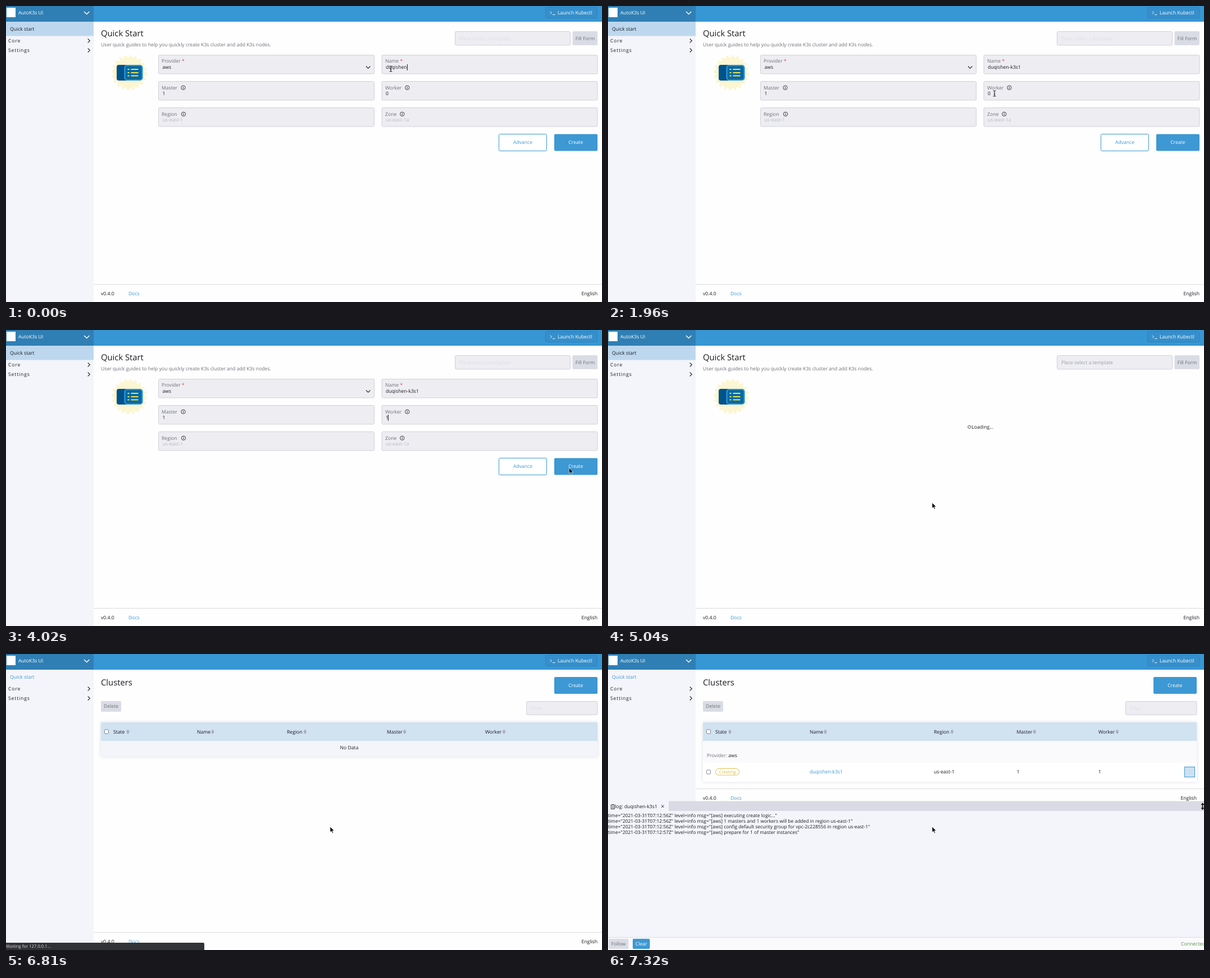
An HTML page for the animation above (8000 ms loop, 1061 by 528 pixels).

```html
<!DOCTYPE html>
<html lang="en">
<head>
<meta charset="utf-8">
<title>Quick Start</title>
<style>
html, body { margin: 0; width: 100%; height: 100%; overflow: hidden; background: #fefefe; }
svg { display: block; width: 1061px; height: 528px; }
text { font: 8.65px "Open Sans", "Noto Sans", sans-serif; fill: #1b1b21; text-rendering: geometricPrecision; white-space: pre; }
.title { font-size: 14.8px; }
.nav { letter-spacing: .85px; }
.mid { text-anchor: middle; }
.end { text-anchor: end; }
.muted { fill: #6f6f79; }
.faint { fill: #b9bac3; }
.ghost { fill: #dddee5; }
.red { fill: #f04848; }
.blue { fill: #3d98d3; }
.white { fill: #fff; }
.log text { font-size: 8.45px; }
.field { fill: #ededf2; stroke: #d0d1db; }
.grey { fill: #dadce5; }
.side { fill: #f4f5fa; }
.head { fill: #d1e2f1; }
.outline { fill: #fff; stroke: #3d98d3; }
.line { fill: none; stroke: #26262c; }
.rule { stroke: #dcdce1; }
.soft { filter: drop-shadow(0 0 3px #dfe0e8); }

/* One 8 s timeline, hard steps only. */
.a { animation: 8s step-end infinite; }
.k1 { animation-name: k1; } .k2 { animation-name: k2; } .k3 { animation-name: k3; }
.k4 { animation-name: k4; } .k5 { animation-name: k5; }
@keyframes k1 { 0% { fill-opacity: 0 } 3.75%, to { fill-opacity: 1 } }
@keyframes k2 { 0% { fill-opacity: 0 } 7.875%, to { fill-opacity: 1 } }
@keyframes k3 { 0% { fill-opacity: 0 } 9.75%, to { fill-opacity: 1 } }
@keyframes k4 { 0% { fill-opacity: 0 } 13.375%, to { fill-opacity: 1 } }
@keyframes k5 { 0% { fill-opacity: 0 } 15.25%, to { fill-opacity: 1 } }

.caret { animation-name: caret; }
@keyframes caret {
  0% { transform: translate(714px, 104px); opacity: 1 }
  3.75% { transform: translate(716.5px, 104px) }
  7.875% { transform: translate(721px, 104px) }
  9.75% { transform: translate(726px, 104px) }
  13.375% { transform: translate(730px, 104px) }
  15.25% { transform: translate(734.5px, 104px); opacity: 1 }
  17.125% { transform: translate(734.5px, 104px); opacity: 0 }
  31.875%, to { transform: translate(680px, 151px); opacity: 1 }
}

.pick { animation-name: pick; }
@keyframes pick { 0% { opacity: 0 } 28.125% { opacity: 1 } 31.875%, to { opacity: 0 } }
.old { animation-name: old; }
@keyframes old { 0% { opacity: 1 } 31.875%, to { opacity: 0 } }
.new { animation-name: new; }
@keyframes new { 0% { opacity: 0 } 31.875%, to { opacity: 1 } }

.form { animation-name: form; }
@keyframes form { 0% { opacity: 1 } 57.5%, to { opacity: 0 } }
.ready { animation-name: ready; }
@keyframes ready { 0% { opacity: 1 } 52.125%, to { opacity: 0 } }
.busy { animation-name: busy; }
@keyframes busy { 0% { opacity: 0 } 52.125%, to { opacity: 1 } }
.hint { animation-name: hint; }
@keyframes hint { 0% { fill: #dddee5 } 57.5%, to { fill: #9b9ca6 } }
.loading { animation-name: loading; }
@keyframes loading { 0% { opacity: 0 } 57.5% { opacity: 1 } 85.125%, to { opacity: 0 } }

.start { animation-name: start; }
@keyframes start { 0% { opacity: 1 } 85.125%, to { opacity: 0 } }
.link { animation-name: link; }
@keyframes link { 0% { fill: #1b1b21 } 85.125%, to { fill: #3d98d3 } }
.empty { animation-name: empty; }
@keyframes empty { 0% { opacity: 0 } 85.125% { opacity: 1 } 88.875%, to { opacity: 0 } }
.list { animation-name: list; }
@keyframes list { 0% { opacity: 0 } 88.875%, to { opacity: 1 } }
.log { animation-name: log; }
@keyframes log { 0% { opacity: 0 } 91.5%, to { opacity: 1 } }

.spin { animation: spin 8s steps(55) -55ms infinite; transform-box: fill-box; transform-origin: center; }
@keyframes spin { to { transform: rotate(1650deg) } }

.beam { animation-name: beam; }
@keyframes beam {
  0% { transform: translate(685px, 112px); opacity: 1 }
  17.125% { transform: translate(689px, 128px) }
  19% { transform: translate(684px, 158px) }
  20.875% { transform: translate(680px, 174px) }
  22.625% { transform: translate(686px, 160px) }
  24.5% { transform: translate(688px, 156px) }
  26.375% { transform: translate(678px, 160px) }
  28.125% { transform: translate(668px, 162px); opacity: 1 }
  35.625%, to { transform: translate(668px, 162px); opacity: 0 }
}
.arrow { animation-name: arrow; }
@keyframes arrow {
  0% { transform: translate(690px, 172px); opacity: 0 }
  35.625% { transform: translate(690px, 172px); opacity: 1 }
  37.375% { transform: translate(735px, 190px) }
  39.25% { transform: translate(800px, 212px) }
  41.125% { transform: translate(870px, 232px) }
  42.875% { transform: translate(935px, 245px) }
  44.75% { transform: translate(976px, 249px) }
  46.625% { transform: translate(995px, 249px) }
  48.375% { transform: translate(1001px, 247px) }
  50.25% { transform: translate(1002.5px, 246px) }
  53.875% { transform: translate(965px, 240px) }
  55.75% { transform: translate(800px, 232px) }
  57.5% { transform: translate(618px, 238px) }
  59.375%, to { transform: translate(577px, 308px); opacity: 1 }
}
</style>
</head>
<body>
<svg viewBox="0 0 1061 528">
  <defs>
    <g id="info">
      <circle r="3.7" class="line" stroke-width=".9"/>
      <path d="M0-.6V2M0-2.1V-1.2" class="line"/>
    </g>
    <path id="sort" d="M-2-.9 0-3.3 2-.9ZM-2 .9 0 3.3 2 .9Z" fill="none" stroke="#73737c" stroke-width=".7"/>
    <path id="next" d="M-1.8-3.5 1.8 0-1.8 3.5" class="line" stroke-width="1.1"/>
    <rect id="box" x="-3.5" y="-3.5" width="7" height="7" rx="1.2" fill="#fff" stroke="#777780" stroke-width=".9"/>
    <circle id="spinner" r="2.5" pathLength="16" fill="none" stroke-width="1.7" stroke-dasharray="1 1"/>
  </defs>

  <rect width="1061" height="528" fill="#fefefe"/>
  <rect y="28" width="156" height="500" class="side"/>
  <rect width="1061" height="28" fill="#3796d4"/>
  <rect width="156" height="28" fill="#307fb4"/>
  <rect x="1" y="3" width="16" height="17" class="white"/>
  <text x="22" y="15" class="white">AutoK3s UI</text>
  <path d="M139 10 143.700 14.500 148.400 10" fill="none" stroke="#fff" stroke-width="1.3"/>
  <rect x="960.500" y="2.500" width="92" height="19" rx="2" fill="#368fca" stroke="#3182ba"/>
  <path d="M969 9.500 971.500 12 969 14.500M973 15.500H977.500" fill="none" stroke="#fff" stroke-width=".9"/>
  <text x="982" y="15" class="white">Launch Kubectl</text>

  <rect y="28" width="156" height="25.500" fill="#bdd8ee" class="a start"/>
  <text x="7" y="43.500" class="a link">Quick start</text>
  <text x="4" y="65" class="nav">Core</text>
  <text x="4" y="82" class="nav">Settings</text>
  <use href="#next" x="147.500" y="62"/>
  <use href="#next" x="147.500" y="79"/>

  <path d="M156 496.500H1061" class="rule"/>
  <text x="169" y="515.500">v0.4.0</text>
  <text x="218" y="515.500" class="blue">Docs</text>
  <text x="1053" y="515.500" class="end">English</text>

  <g class="a start">
    <text x="169" y="54" class="title">Quick Start</text>
    <text x="169" y="72" class="muted">User quick guides to help you quickly create K3s cluster and add K3s nodes.</text>
    <rect x="799.500" y="45.500" width="205" height="24.500" rx="2" class="field"/>
    <text x="807" y="60.700" class="a hint">Place select a template</text>
    <rect x="1008.500" y="45" width="44.500" height="25" rx="2" class="grey"/>
    <text x="1031" y="60.700" class="muted mid">Fill Form</text>

    <g transform="translate(219.500 119)">
      <circle r="28" fill="#fcf6d2"/>
      <circle r="29" pathLength="40" fill="none" stroke="#fcf6d2" stroke-width="5" stroke-dasharray="1 1"/>
      <rect x="-22.500" y="-14" width="24" height="28" rx="4" fill="#00528b"/>
      <rect x="-8" y="-13" width="31" height="26" rx="4" fill="#0768a6" stroke="#2c97d6" stroke-width="2.200"/>
      <path d="M-3-6H0M3-6H16M-3 0H0M3 0H16M-3 5.500H0M3 5.500H16" stroke="#f3e53c" stroke-width="2.200"/>
    </g>
  </g>

  <g class="a form">
    <rect x="271.500" y="87.500" width="384" height="33.500" rx="2" class="field"/>
    <text x="277" y="101.300" class="muted">Provider <tspan class="red">*</tspan></text>
    <text x="278.500" y="112">aws</text>
    <path d="M641 107.500 644.700 111.200 648.400 107.500" class="line" stroke-width="1.100"/>

    <rect x="669" y="87.500" width="384" height="33.500" rx="2" class="field"/>
    <text x="675" y="101.300" class="muted">Name <tspan class="red">*</tspan></text>
    <text x="676" y="112">duqishen<tspan class="a k1">-</tspan><tspan class="a k2">k</tspan><tspan class="a k3">3</tspan><tspan class="a k4">s</tspan><tspan class="a k5">1</tspan></text>

    <rect x="271.500" y="134.500" width="384" height="33.500" rx="2" class="field"/>
    <text x="277" y="148.500" class="muted">Master</text>
    <use href="#info" x="315.500" y="145.700"/>
    <text x="278.500" y="159.300">1</text>

    <rect x="669" y="134.500" width="384" height="33.500" rx="2" class="field"/>
    <text x="675" y="148.500" class="muted">Worker</text>
    <use href="#info" x="714.300" y="145.700"/>
    <rect x="676" y="151" width="5" height="11" fill="#b4d6fb" class="a pick"/>
    <text x="676" y="159.300" class="a old">0</text>
    <text x="676" y="159.300" class="a new">1</text>

    <rect x="271.500" y="181.500" width="384" height="33.500" rx="2" class="field"/>
    <text x="277" y="195.500" class="muted">Region</text>
    <use href="#info" x="316" y="192.800"/>
    <text x="278.500" y="206.300" class="faint">us-east-1</text>

    <rect x="669" y="181.500" width="384" height="33.500" rx="2" class="field"/>
    <text x="675" y="195.500" class="muted">Zone</text>
    <use href="#info" x="705.300" y="192.800"/>
    <text x="676" y="206.300" class="faint">us-east-1a</text>

    <g class="a ready">
      <rect x="877.500" y="228.500" width="85" height="30" rx="2" class="outline"/>
      <text x="920" y="246.300" class="blue mid">Advance</text>
      <rect x="976" y="228.500" width="77" height="30" rx="2" class="blue"/>
      <text x="1014.300" y="246.300" class="white mid">Create</text>
    </g>
    <g class="a busy">
      <rect x="868.500" y="228.500" width="85" height="30" rx="2" class="outline"/>
      <text x="911" y="246.300" class="blue mid">Advance</text>
      <rect x="967" y="228.500" width="86" height="30" rx="2" class="blue"/>
      <g transform="translate(997 243.500)"><use href="#spinner" class="spin" stroke="#fff"/></g>
      <text x="1003" y="246.300" class="white">Create</text>
    </g>
    <rect width="1" height="11" fill="#1b1b21" class="a caret"/>
  </g>

  <g class="a loading">
    <g transform="translate(643.300 173)"><use href="#spinner" class="spin" stroke="#26262c"/></g>
    <text x="647.300" y="175.700">Loading...</text>
  </g>

  <g class="a empty">
    <text x="169" y="56" class="title">Clusters</text>
    <rect x="976" y="41" width="77" height="30" rx="2" class="blue"/>
    <text x="1014.300" y="59" class="white mid">Create</text>
    <rect x="169" y="84" width="36" height="19" rx="2" class="grey"/>
    <text x="187" y="96.300" class="muted mid">Delete</text>
    <rect x="926.500" y="84.500" width="126.500" height="24" rx="2" class="field"/>
    <text x="934" y="99.700" class="ghost">Filter</text>
    <g class="soft">
      <rect x="169" y="122" width="884" height="61" class="side"/>
      <rect x="169" y="122" width="884" height="33" class="head"/>
    </g>
    <use href="#box" x="179" y="138.500"/>
    <text y="141.500"><tspan x="191">State</tspan><tspan x="340">Name</tspan><tspan x="500">Region</tspan><tspan x="678">Master</tspan><tspan x="853">Worker</tspan></text>
    <use href="#sort" x="217" y="138.700"/>
    <use href="#sort" x="368" y="138.700"/>
    <use href="#sort" x="532.300" y="138.700"/>
    <use href="#sort" x="709.700" y="138.700"/>
    <use href="#sort" x="886.500" y="138.700"/>
    <text x="611" y="170" class="mid">No Data</text>
    <path d="M0 515H351Q353 515 353 517V528H0Z" fill="#323337"/>
    <text x="0" y="524" fill="#fff" style="font-size:7.700px;fill:#d9d9dc">Waiting for 127.0.0.1...</text>
  </g>

  <g class="a list">
    <text x="169" y="56" class="title">Clusters</text>
    <rect x="971" y="41" width="77" height="30" rx="2" class="blue"/>
    <text x="1009.300" y="59" class="white mid">Create</text>
    <rect x="169" y="84" width="36" height="19" rx="2" class="grey"/>
    <text x="187" y="96.300" class="muted mid">Delete</text>
    <rect x="921.500" y="84.500" width="126.500" height="24" rx="2" class="field"/>
    <text x="929" y="99.700" class="ghost">Filter</text>
    <g class="soft">
      <rect x="169" y="122" width="879" height="106" fill="#fff"/>
      <rect x="169" y="155" width="879" height="39" fill="#fafafc"/>
      <rect x="169" y="122" width="879" height="33" class="head"/>
    </g>
    <use href="#box" x="179" y="138.500"/>
    <text y="141.500"><tspan x="191">State</tspan><tspan x="359">Name</tspan><tspan x="580">Region</tspan><tspan x="727.500">Master</tspan><tspan x="873">Worker</tspan></text>
    <use href="#sort" x="217" y="138.700"/>
    <use href="#sort" x="387" y="138.700"/>
    <use href="#sort" x="612.500" y="138.700"/>
    <use href="#sort" x="759.300" y="138.700"/>
    <use href="#sort" x="906.500" y="138.700"/>
    <text x="176" y="183.500" class="muted">Provider: <tspan fill="#1b1b21">aws</tspan></text>
    <use href="#box" x="179" y="210.500"/>
    <rect x="191.500" y="204.500" width="42" height="11.500" rx="5.700" fill="#fff" stroke="#dcc24c"/>
    <text x="212.500" y="213" class="mid" style="font-size:7.600px;fill:#d8b93a">Creating</text>
    <text x="359" y="213.300" class="blue">duqishen-k3s1</text>
    <text y="213.300"><tspan x="580">us-east-1</tspan><tspan x="727.500">1</tspan><tspan x="873">1</tspan></text>
    <rect x="1026.500" y="201.500" width="18" height="18" fill="#cde1f1" stroke="#3d98d3"/>
    <path d="M1035.500 207.500V214" stroke="#8dbfe2" stroke-dasharray="1 1.700"/>

    <rect x="157" y="240" width="904" height="23" fill="#fefefe"/>
    <path d="M157 240.500H1061" class="rule"/>
    <text x="169" y="260">v0.4.0</text>
    <text x="218" y="260" class="blue">Docs</text>
    <text x="1048" y="260" class="end">English</text>

    <rect y="262.500" width="1061" height="265.500" class="side"/>
    <rect x="108" y="262.500" width="953" height="17.500" fill="#d9dae4"/>
    <path d="M5.500 269H11.500V276.500H5.500ZM7 268.500H10M7 272H10M7 274.300H10" class="line" stroke-width=".9"/>
    <text x="12.300" y="274.700">log: duqishen-k3s1</text>
    <path d="M95 269.500 99.500 274M99.500 269.500 95 274" class="line"/>
    <path d="M1058.500 265.500 1061.500 269H1059.300V274.500H1061.500L1058.500 278 1055.500 274.500H1057.700V269H1055.500Z"/>
    <rect y="506" width="1061" height="22" fill="#fafafc"/>
    <path d="M0 505.500H1061" class="rule"/>
    <rect x="1" y="508" width="35.500" height="18" rx="2" class="grey"/>
    <text x="18.700" y="520" class="muted mid">Follow</text>
    <rect x="44" y="508" width="30.500" height="18" rx="2" class="blue"/>
    <text x="59.200" y="520" class="white mid">Clear</text>
    <text x="1020" y="520" style="fill:#559147">Connected</text>
  </g>

  <g class="a log">
    <text y="290.700">time="2021-03-31T07:12:56Z" level=info msg="[aws] executing create logic..."</text>
    <text y="301">time="2021-03-31T07:12:56Z" level=info msg="[aws] 1 masters and 1 workers will be added in region us-east-1"</text>
    <text y="311.200">time="2021-03-31T07:12:56Z" level=info msg="[aws] config default security group for vpc-2c228556 in region us-east-1"</text>
    <text y="321.400">time="2021-03-31T07:12:57Z" level=info msg="[aws] prepare for 1 of master instances"</text>
  </g>

  <path d="M-2.500-5Q0-5 0-3.500Q0-5 2.500-5M0-4V4M-2.500 5Q0 5 0 3.500Q0 5 2.500 5M-1.300 1H1.300" class="line a beam" stroke-width="1.100"/>
  <path d="M0 0V10L2.300 7.900 3.900 11.500 5.600 10.800 4 7.300H7.200Z" fill="#000" stroke="#fff" stroke-width=".7" class="a arrow"/>
</svg>
</body>
</html>
```
